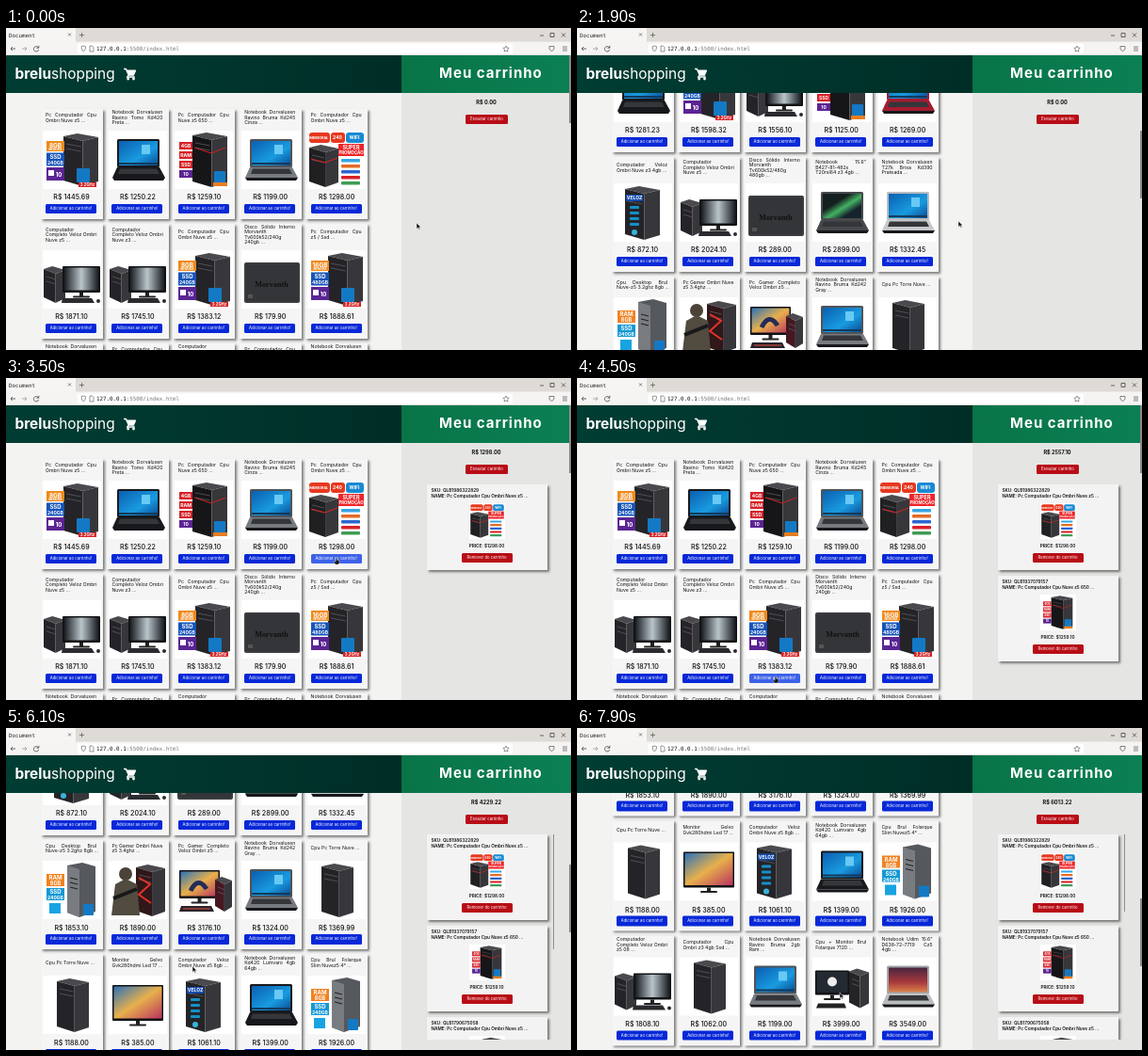
These frames come from a looping animation (600 px wide and 342 px high, 8 s). An HTML page:

```html
<!DOCTYPE html>
<html lang="pt-BR">
<head>
<meta charset="utf-8">
<title>Document</title>
<style>
html, body { margin: 0; width: 100%; height: 100%; overflow: hidden; background: #f3f3f2; }
#stage { position: relative; width: 600px; height: 342px; overflow: hidden; background: #f3f3f2; font-family: Inter, "Open Sans", sans-serif; color: #111; }
#stage div, #stage svg { position: absolute; white-space: nowrap; }
.layer { left: 0; top: 0; }
.card { width: 66px; background: #f5f5f5; box-shadow: 1.5px 1.5px 2.5px rgba(0,0,0,.5); }
.card .title { left: 5.5px; width: 54px; top: 0; display: flex; flex-direction: column; justify-content: center; font-size: 5.15px; line-height: 5.5px; }
.card .title p { margin: 0; text-align: justify; text-align-last: justify; }
.card .title p:last-child { text-align-last: left; }
.card svg { left: 2px; bottom: 32px; width: 62px; height: 62px; background: #fff; }
.price { left: 0; width: 66px; bottom: 18.5px; text-align: center; font-size: 7.1px; line-height: 9px; font-weight: 500; }
.btn { border-radius: 1.5px; color: #fff; text-align: center; font-size: 4.25px; line-height: 10.5px; height: 10.5px; width: 54px; background: #0728d8; }
.card .btn { left: 5.5px; bottom: 5.5px; }
#stage .red { background: #b80d16; }
#side { left: 420px; top: 69px; width: 180px; height: 273px; background: #e5e5e4; }
#total { left: 0; width: 180px; top: 6px; text-align: center; font-size: 5.6px; line-height: 8px; font-weight: 700; }
#list { left: 20px; top: 44px; width: 142px; height: 218px; overflow: hidden; }
.item { left: 6.5px; width: 128px; height: 91px; background: #f3f3f3; box-shadow: 1.5px 1.5px 2.5px rgba(0,0,0,.5); font-size: 4.7px; line-height: 6px; font-weight: 600; }
.item svg { left: 45px; top: 20px; width: 38px; height: 38px; background: #fff; }
.item .btn { left: 37px; top: 72.5px; font-weight: 400; }
</style>
</head>
<body>
<div id="stage">
  <div id="grid" class="layer"></div>
  <div id="side">
    <div id="total"></div>
    <div class="btn red" style="left:68px;top:22.7px;width:45px">Esvaziar carrinho</div>
    <div id="list"></div>
    <div id="listBar" style="left:160.5px;top:44px;width:1.5px;background:#8d8d8d"></div>
  </div>
  <svg class="layer" id="frame" width="600" height="342">
    <defs>
      <linearGradient id="dark"><stop stop-color="#003d33"/><stop offset="1" stop-color="#002e27"/></linearGradient>
      <linearGradient id="green"><stop stop-color="#087447"/><stop offset="1" stop-color="#0b8054"/></linearGradient>
      <linearGradient id="sky" x2="1" y2="1"><stop stop-color="#0b5fb0"/><stop offset=".6" stop-color="#199be0"/><stop offset="1" stop-color="#0a4d96"/></linearGradient>
      <linearGradient id="leaf" x2="1" y2="1"><stop offset=".35" stop-color="#14201f"/><stop offset=".55" stop-color="#43b163"/><stop offset=".75" stop-color="#15232c"/></linearGradient>
      <linearGradient id="sunset" x2="1" y2="1"><stop stop-color="#2c72b8"/><stop offset=".5" stop-color="#e8b04c"/><stop offset="1" stop-color="#b8335e"/></linearGradient>
      <linearGradient id="dusk" x2="0" y2="1"><stop stop-color="#4a2440"/><stop offset=".6" stop-color="#a83a3c"/><stop offset="1" stop-color="#d9824a"/></linearGradient>
      <linearGradient id="mist" x2="1" y2="0"><stop stop-color="#14181c"/><stop offset=".5" stop-color="#b9c5cb"/><stop offset="1" stop-color="#14181c"/></linearGradient>
    </defs>
    <g id="bars"></g>
  </svg>
  <div id="pageBar" style="left:598px;width:2px;height:72px;background:#8b8b8b"></div>
  <svg class="layer" width="600" height="342"><g id="cursor">
    <path id="arrow" d="M0 0V6.4L1.6 5L2.7 7.2L3.7 6.7L2.7 4.7H4.7Z" fill="#111" stroke="#fff" stroke-width=".5"/>
    <path id="hand" d="M-.8 0q.8-1 1.5 0V2.3L3 3V5.2L2 7H-1.2L-3 4.2L-2.2 3.4L-.8 4.3Z" fill="#111" stroke="#fff" stroke-width=".4"/>
  </g></svg>
</div>
<script>
const $ = id => document.getElementById(id);
const rect = (x, y, w, h, fill, r = 0) => `<rect x="${x}" y="${y}" width="${w}" height="${h}" rx="${r}" fill="${fill}"/>`;
const poly = (points, fill) => `<polygon points="${points}" fill="${fill}"/>`;
const dot = (x, y, r, fill) => `<circle cx="${x}" cy="${y}" r="${r}" fill="${fill}"/>`;
const line = (d, color, w = 1) => `<path d="${d}" fill="none" stroke="${color}" stroke-width="${w}"/>`;
const label = (x, y, s, size, fill = '#fff', extra = 'font-weight="700" text-anchor="middle"') =>
  `<text x="${x}" y="${y}" font-size="${size}" fill="${fill}" ${extra}>${s}</text>`;

// Product drawings on a 62 by 62 field
const tower = (x = 22, y = 3, w = 37, h = 56, front = '#242428') =>
  poly([x, y + 3, x + w * .4, y, x + w, y + 4, x + w * .55, y + 8], '#4a4a4e') +
  poly([x, y + 3, x + w * .55, y + 8, x + w * .55, y + h, x, y + h - 6], front) +
  poly([x + w * .55, y + 8, x + w, y + 4, x + w, y + h - 5, x + w * .55, y + h], '#37373b') +
  line(`M${x + 3} ${y + 11}l${w * .42} 3M${x + 3} ${y + 16}l${w * .42} 3`, '#5b5b60', .8);
const badge = (x, y, s = 14) => rect(x, y, s, s + 1, '#1479c4', 1);
const specs = (ram, disk) => rect(4, 11, 19, 11, '#f08a1c') + label(13.5, 18, ram, 6.4) + label(13.5, 21.4, 'MEMORIA', 2.8) +
  rect(4, 23.5, 19, 14, '#1654b8') + label(13.5, 30, 'SSD', 6) + label(13.5, 36, disk, 5) +
  rect(4, 39, 19, 14, '#5b2494') + rect(6, 42, 6, 6, '#fff') + label(17, 49, '10', 6);
const specTower = (ram, disk) => tower() + specs(ram, disk) + badge(36, 40) + rect(38, 55, 19, 5, '#d52426') + label(47.5, 59, '3.2GHz', 4.2);
const redTower = () => tower(19, 2, 37, 58, '#161618') + line('M21 18L39 24L54 18', '#d42020', 1) +
  [12, 22, 32, 42].map((y, i) => rect(5, y, 14, 8, i < 3 ? '#d62128' : '#5b2494') + label(12, y + 6, ['4GB', 'RAM', 'SSD', '10'][i], 5)).join('') +
  badge(42, 43, 12) + rect(41, 55, 15, 4, '#e77d21');
const laptop = (body, screen, deck = body) => rect(9, 9, 45, 30, body, 1.5) + rect(11, 11, 41, 26, screen) +
  (screen === 'url(#sky)' ? rect(35, 15, 9, 10, '#67c9f4') + rect(11, 34, 41, 2, '#123b5c') : '') +
  poly('9,39 54,39 60,50 4,50', deck) + poly('12,40.5 51,40.5 54,46 10,46', '#34363a') + poly('4,50 60,50 58,53 6,53', '#17181b');
const promo = () => rect(2, 2, 22, 11, '#e73820', 3) + rect(25, 2, 15, 11, '#e73820', 3) + rect(41, 2, 19, 11, '#198ad3', 3) +
  label(12, 9, 'MEMORIA', 4) + label(32, 9, '240', 5) + label(50, 9, 'WIFI', 5) + tower(2, 15, 31, 45, '#202023') +
  line('M4 30L19 34L32 29', '#d22', 1) + rect(33, 14, 27, 13, '#ef2428') + label(46.5, 20, 'SUPER', 5.5) + label(46.5, 25, 'PROMOÇÃO', 4.4) +
  ['#35a5e2', '#e36a24', '#2c66d0', '#d92025', '#3f9c53'].map((c, i) => rect(36, 30 + i * 6, 20, 3.5, c, 1)).join('');
const monitor = (x, y, w, h, screen) => rect(x, y, w, h, '#111215', 1) + rect(x + 1.5, y + 1.5, w - 3, h - 4, screen) +
  rect(x + w / 2 - 2, y + h, 4, 4, '#222') + rect(x + w / 2 - 9, y + h + 3.5, 18, 2, '#222', 1);
const deskSet = () => tower(1, 17, 23, 39) + monitor(21, 17, 40, 28, 'url(#mist)') +
  poly('21,51 52,51 55,56 20,56', '#2a2b2f') + dot(59, 54, 2, '#2a2b2f');
const ssd = () => rect(3, 13, 59, 43, '#3b3d40', 2) + rect(5, 15, 55, 39, '#333538', 1) +
  label(32, 39, 'Morvanth', 8.2, '#111', 'font-weight="700" text-anchor="middle" font-family="Liberation Serif, serif"') + rect(7, 47, 5, 4, '#555');
const blueTower = () => tower(12, 3, 37, 57) + rect(13, 12, 18, 7, '#174caf') + label(22, 17, 'VELOZ', 5) +
  [24, 30, 36, 42].map(y => rect(17, y, 10, 3, '#1591c6', 1)).join('') + dot(22, 52, 3, '#39b3dc');
const slim = () => poly('26,5 42,2 56,6 56,54 39,60 26,55', '#55585c') + poly('26,5 39,9 39,60 26,55', '#787c80') +
  line('M29 18l8 2M29 23l8 2M29 28l8 2', '#222', 1.2) +
  rect(4, 14, 19, 13, '#f08220') + label(13.5, 20, 'RAM', 6) + label(13.5, 26, '8GB', 5.5) +
  rect(4, 29, 19, 13, '#1598d4') + label(13.5, 35, 'SSD', 6) + label(13.5, 41, '240GB', 5) + rect(7, 45, 12, 11, '#18a4e2') + badge(43, 46, 11);
const gamer = () => tower(29, 4, 31, 55, '#301719') + line('M32 18L44 25L32 36L45 45', '#e4332a', 2) +
  dot(18, 14, 7, '#4b4238') + poly('3,58 7,25 18,19 30,25 33,58', '#514b40') + line('M5 40L30 30', '#17191a', 4);
const gamerSet = () => monitor(5, 10, 43, 30, 'url(#sunset)') + tower(43, 17, 18, 37, '#451821') +
  poly('7,48 39,48 42,54 5,54', '#29232c') + line('M9 51H38', '#e34e39', 1) + line('M17 32q8-16 17-2', '#252c57', 5);
const plain = () => tower(15, 3, 34, 57);
const darkBook = () => laptop('#18191d', 'url(#sky)');
const grayBook = () => laptop('#505357', 'url(#sky)', '#777b80');
const dualSet = () => tower(39, 12, 21, 42) + monitor(3, 14, 36, 26, '#242a31') + dot(21, 26, 5, '#eee') + poly('6,49 34,49 36,54 4,54', '#222');

const pc = 'Pc Computador Cpu', note = 'Notebook Dorvaluxen', full = 'Computador|Completo Veloz Ombri|';
const rows = [
  [[`${pc}|Ombri Nuve z5 ...`, 1445.69, specTower('8GB', '240GB')], [`${note}|Ravino Tomo Kd420|Preta ...`, 1250.22, darkBook()],
   [`${pc}|Nuve z5 650 ...`, 1259.10, redTower()], [`${note}|Ravino Bruma Kd245|Cinza ...`, 1199, grayBook()], [`${pc}|Ombri Nuve z5 ...`, 1298, promo()]],
  [[`${full}Nuve z5 ...`, 1871.10, deskSet()], [`${full}Nuve z3 ...`, 1745.10, deskSet()], [`${pc}|Ombri Nuve z5 ...`, 1383.12, specTower('8GB', '240GB')],
   ['Disco Sólido Interno|Morvanth|Tv600k52/240g|240gb ...', 179.90, ssd()], [`${pc}|z5 / Ssd ...`, 1888.61, specTower('16GB', '480GB')]],
  [[`${note}|Ravino Tomo Kd360|Preta ...`, 1281.23, darkBook()], [`${pc}|Nuve z5 3470 ...`, 1598.32, specTower('16GB', '240GB')], [`${full}z3 04 ...`, 1556.10, deskSet()],
   [`${pc}|Nuve z5 650 ...`, 1125, redTower()], [`${note}|Ravino Bruma Kd 246|...`, 1269, laptop('#a51c30', 'url(#sky)')]],
  [['Computador Veloz|Ombri Nuve z3 4gb ...', 872.10, blueTower()], [`${full}Nuve z5 ...`, 2024.10, deskSet()],
   ['Disco Sólido Interno|Morvanth|Tv600k52/480g|480gb ...', 289, ssd()], ['Notebook 15.6"|B427-81-482x|T20rsl64 z3 4gb ...', 2899, laptop('#48494d', 'url(#leaf)')],
   [`${note}|T27k Brisa Kd390|Prateada ...`, 1332.45, laptop('#b9bcc0', 'url(#sky)', '#c7c9cc')]],
  [['Cpu Desktop Brul|Nuve-z5 3.2ghz 8gb ...', 1853.10, slim()], ['Pc Gamer Ombri Nuve|z5 3.4ghz ...', 1890, gamer()], ['Pc Gamer Completo|Veloz Ombri z5 ...', 3176.10, gamerSet()],
   [`${note}|Ravino Bruma Kd242|Gray ...`, 1324, grayBook()], ['Cpu Pc Torre Nuve ...', 1369.99, plain()]],
  [['Cpu Pc Torre Nuve ...', 1188, plain()], ['Monitor Gelvo|Gvk280hdmi Led 17 ...', 385, monitor(4, 10, 54, 38, 'url(#sunset)')],
   ['Computador Veloz|Ombri Nuve z5 8gb ...', 1061.10, blueTower()], [`${note}|Kd420 Lumvaro 4gb|64gb ...`, 1399, darkBook()], ['Cpu Brul Folarque|Slim Nuvez5 4° ...', 1926, slim()]],
  [[`${full}z5 08 ...`, 1808.10, deskSet()], ['Computador Cpu|Ombri z3 4gb Ssd ...', 1062, plain()], [`${note}|Ravino Bruma 2gb|Ram ...`, 1199, grayBook()],
   ['Cpu + Monitor Brul|Folarque 7120 ...', 3999, dualSet()], ['Notebook Udim 15.6"|D638-72-7719 Cz5|4gb ...', 3549, laptop('#a4a7ab', 'url(#dusk)', '#babdc0')]]
];
const picture = art => `<svg viewBox="0 0 62 62">${art}</svg>`;

let rowTop = 86, html = '';
const buttons = [];
for (const row of rows) {
  const tall = row.some(([title]) => title.split('|').length > 3);
  const height = tall ? 122 : 116.8;
  row.forEach(([title, price, art], col) => {
    const left = 36.5 + col * 70.4;
    html += `<div class="card" style="left:${left}px;top:${rowTop}px;height:${height}px">
      <div class="title" style="height:${tall ? 24 : 19}px">${title.split('|').map(s => `<p>${s}</p>`).join('')}</div>
      ${picture(art)}<div class="price">R$ ${price.toFixed(2)}</div><div class="btn">Adicionar ao carrinho!</div></div>`;
    buttons.push({ x: left + 5.5, y: rowTop + height - 16 });
  });
  rowTop += height + 5;
}
$('grid').innerHTML = html;
document.querySelectorAll('#grid .btn').forEach((el, i) => buttons[i].el = el);

// Cart additions: time, row, column, code
const purchases = [[3200, 0, 4, '1986322829'], [4000, 0, 2, '1937079157'], [4600, 1, 2, '1790675058'], [5500, 3, 2], [6700, 5, 1], [7200, 5, 3]];
$('list').innerHTML = purchases.slice(0, 3).map(([, r, c, sku], i) => {
  const [title, price, art] = rows[r][c];
  return `<div class="item" style="top:${i * 97}px"><div style="left:5px;top:3px">SKU: QLB${sku}<br>NAME: ${title.replaceAll('|', ' ')}</div>
    ${picture(art)}<div style="left:0;width:128px;top:62px;text-align:center">PRICE: $${price.toFixed(2)}</div><div class="btn red">Remover do carrinho</div></div>`;
}).join('');
const items = [...document.querySelectorAll('.item')];

const mono = 'font-family="DejaVu Sans Mono, monospace"';
$('bars').innerHTML = rect(0, 0, 600, 15, '#dedad6') + rect(0, 0, 74, 15, '#f6f5f4') + rect(0, 14.5, 600, 14.5, '#f5f4f3') +
  rect(76, 16.5, 462, 11, '#fff', 2) + line('M0 28.7H600', '#cfcdca', .6) +
  label(3, 9.6, 'Document', 5.8, '#222', mono) + line('M66 5.5l3 3m0-3l-3 3M78 7.5h5M80.5 5v5', '#555', .7) +
  line('M567 8h4M578 5.5h4v4h-4zM590 5.5l4 4m0-4l-4 4', '#444', .8) +
  line('M10 22H5m2-2l-2 2l2 2', '#444', .8) + line('M17 22h5m-2-2l2 2l-2 2', '#999', .8) +
  line('M34.5 21a2.7 2.7 0 1 0 .2 2M34.8 18.8v2.4h-2.4', '#444', .8) +
  line('M80 19.7l2.3-.7l2.3.7q0 4-2.3 5.3q-2.3-1.3-2.3-5.3zM89 19h2.5l1.5 1.5V25H89z', '#666', .7) +
  `<text x="96" y="24" font-size="5.85" fill="#777" ${mono}><tspan fill="#111">127.0.0.1</tspan>:5500/index.html</text>` +
  line('M531 19l1 2.1l2.2.2l-1.7 1.6l.5 2.2l-2-1.1l-2 1.1l.5-2.2l-1.7-1.6l2.2-.2z', '#555', .6) +
  line('M577 19.5h5v2.5q-2.5 5-5 0zM591 20h5M591 22h5M591 24h5', '#555', .7) +
  rect(0, 29, 420, 40, 'url(#dark)') + rect(420, 29, 180, 40, 'url(#green)') +
  `<text x="9.5" y="54" font-size="15.4" fill="#fff"><tspan font-weight="700">brelu</tspan>shopping</text>` +
  line('M125 43.5h2.3l3 6.5h5l2.2-4.8M130 50l-1.2 2h8', '#fff', 1.4) + poly('128,44.6 138,44.6 135.4,50 130.4,50', '#fff') +
  dot(129.7, 54, 1.4, '#fff') + dot(135.5, 54, 1.4, '#fff') +
  label(460, 53.2, 'Meu carrinho', 15, '#fff', 'font-weight="700" letter-spacing="1"');

const scrollKeys = [[500, 0], [1200, 200], [1600, 400], [1800, 400], [2300, 0], [4650, 0], [5100, 324], [5600, 324], [6100, 465], [6300, 530], [7400, 530], [7900, 606.5]];
const cursorKeys = [[200, 436, 207], [900, 405, 205], [2700, 405, 205], [3100, 351, 191], [3600, 351, 191], [3900, 210, 191], [4100, 210, 191],
  [4400, 211, 317], [5150, 211, 317], [5400, 209, 243], [5650, 209, 243], [6000, 198, 253], [6300, 198, 253], [6600, 139, 281], [6800, 139, 281], [7100, 279, 281]];

function track(keys, t) {
  const next = keys.findIndex(k => k[0] > t);
  if (next < 0) return keys.at(-1).slice(1);
  if (next === 0) return keys[0].slice(1);
  const a = keys[next - 1], b = keys[next], p = (t - a[0]) / (b[0] - a[0]);
  return a.slice(1).map((v, i) => v + (b[i + 1] - v) * p);
}

function draw(t) {
  const [offset] = track(scrollKeys, t), [x, y] = track(cursorKeys, t);
  $('grid').style.transform = `translateY(${-offset}px)`;
  $('pageBar').style.top = 29 + offset * .25 + 'px';

  let hovering = false;
  for (const b of buttons) {
    const over = x > b.x && x < b.x + 54 && y + offset > b.y && y + offset < b.y + 10.5;
    b.el.style.background = over ? '#3d62e8' : '';
    hovering ||= over;
  }
  $('cursor').setAttribute('transform', `translate(${x} ${y})`);
  $('arrow').style.display = hovering ? 'none' : '';
  $('hand').style.display = hovering ? '' : 'none';

  const bought = purchases.filter(p => t >= p[0]);
  $('total').textContent = 'R$ ' + bought.reduce((sum, [, r, c]) => sum + rows[r][c][1], 0).toFixed(2);
  items.forEach((el, i) => el.style.display = i < bought.length ? '' : 'none');
  $('listBar').style.height = (bought.length > 2 ? 218 * 218 / (bought.length * 97) : 0) + 'px';
}

const start = performance.now();
function tick() {
  draw(Math.floor((performance.now() - start) % 8000 / 100) * 100);
  requestAnimationFrame(tick);
}
tick();
</script>
</body>
</html>
```
